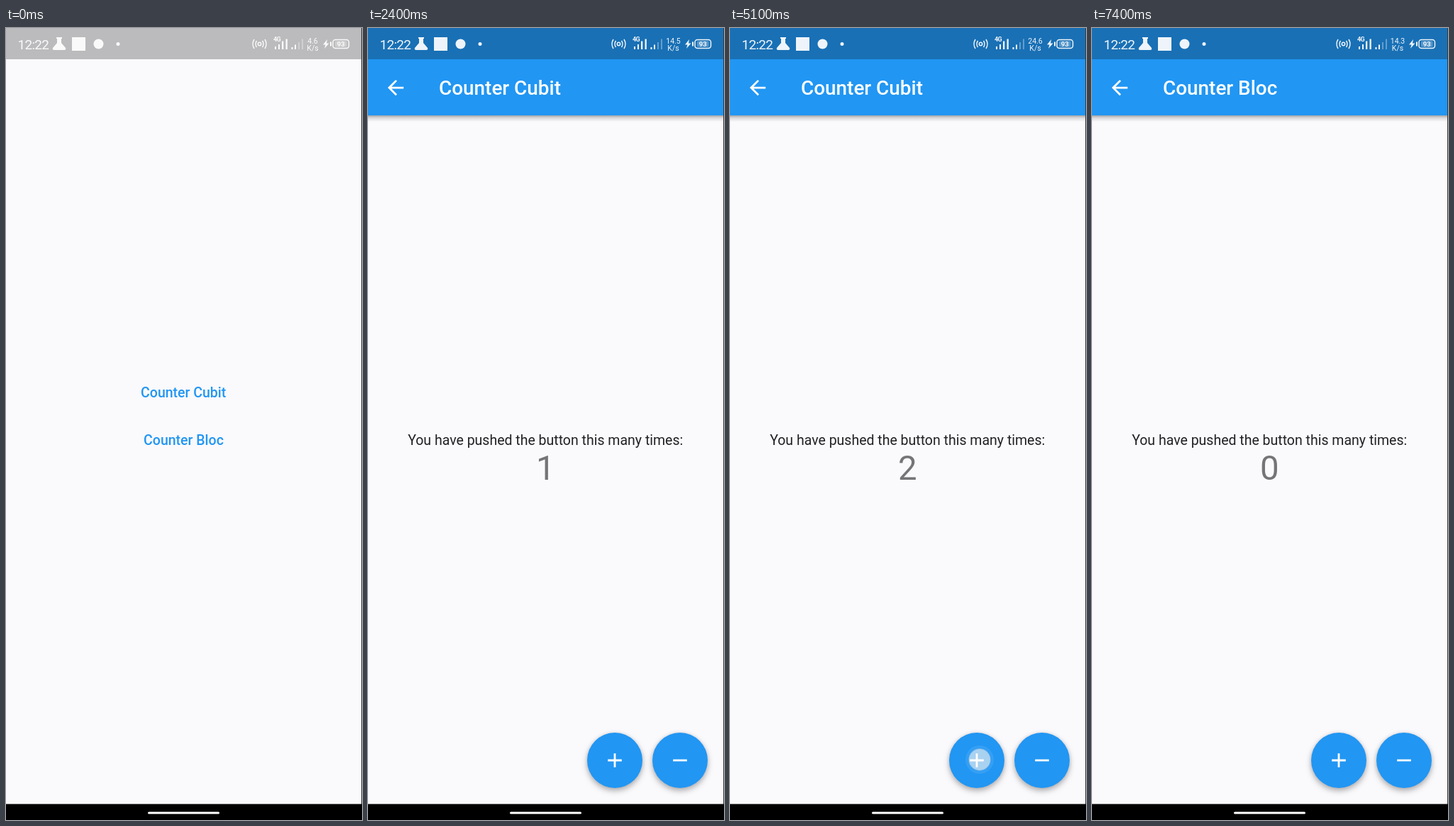
Write an HTML page that moves like this. It is 502 px wide and 1115 px high and loops after 8 s.

```html
<!DOCTYPE html>
<html lang="en">
<head>
<meta charset="utf-8">
<title>Counter demo</title>
<style>
  html, body { margin: 0; width: 100%; height: 100%; overflow: hidden; background: #000; }
  svg { display: block; width: 100vw; height: 100vh; font-family: Roboto, sans-serif; }
  #home, #page { transform-origin: 251px 568px; }
  .mid { text-anchor: middle; }
  .button { font-size: 19.5px; font-weight: 500; fill: #2196f3; }
  .fab { fill: #2196f3; filter: drop-shadow(0 4px 4px rgba(0,0,0,.28)) drop-shadow(0 0 2px rgba(0,0,0,.1)); }
  .icon { stroke: #fff; stroke-width: 2.8; fill: none; }
  .status { fill: #fff; opacity: .93; }
  .line { fill: none; stroke: #fff; stroke-width: 1.5; }
</style>
</head>
<body>
<svg viewBox="0 0 502 1115">
  <defs>
    <clipPath id="clip-cubit"><rect x="179" y="488" width="142" height="50" rx="5.6"/></clipPath>
    <clipPath id="clip-bloc"><rect x="183" y="555" width="135" height="50" rx="5.6"/></clipPath>
    <clipPath id="clip-back"><circle cx="39" cy="84" r="33"/></clipPath>
    <clipPath id="clip-plus"><circle cx="348" cy="1031" r="39"/></clipPath>
    <clipPath id="clip-minus"><circle cx="440" cy="1031" r="39"/></clipPath>
    <linearGradient id="shade" x2="0" y2="1">
      <stop stop-opacity=".34"/><stop offset=".4" stop-opacity=".13"/><stop offset="1" stop-opacity="0"/>
    </linearGradient>
  </defs>

  <g id="home">
    <rect width="502" height="1115" fill="#faf9fc"/>
    <g id="ink-cubit" clip-path="url(#clip-cubit)"/>
    <g id="ink-bloc" clip-path="url(#clip-bloc)"/>
    <text class="mid button" x="250.2" y="520">Counter Cubit</text>
    <text class="mid button" x="250.5" y="587">Counter Bloc</text>
  </g>

  <g id="page">
    <rect width="502" height="1115" fill="#faf9fc"/>
    <rect y="123" width="502" height="9" fill="url(#shade)"/>
    <rect width="502" height="123" fill="#2196f3"/>
    <g id="ink-back" clip-path="url(#clip-back)"/>
    <path transform="translate(22.3 67.3) scale(1.394)" fill="#fff"
      d="M20 11H7.83l5.59-5.59L12 4l-8 8 8 8 1.41-1.41L7.83 13H20z"/>
    <text id="title" x="100" y="94" font-size="27.9" font-weight="500" fill="#fff"></text>
    <text class="mid" x="250.2" y="587" font-size="19.5" fill="#222124">You have pushed the button this many times:</text>
    <text id="count" class="mid" x="250.2" y="636" font-size="47.4" fill="#757477"></text>
    <circle class="fab" cx="348" cy="1031" r="39"/>
    <g id="ink-plus" clip-path="url(#clip-plus)"/>
    <path class="icon" d="M338.2 1031h19.6M348 1021.2v19.6"/>
    <circle class="fab" cx="440" cy="1031" r="39"/>
    <g id="ink-minus" clip-path="url(#clip-minus)"/>
    <path class="icon" d="M430.2 1031h19.6"/>
  </g>

  <rect width="502" height="44" opacity=".255"/>
  <g class="status">
    <text x="16.5" y="30" font-size="19" letter-spacing="-.7">12:22</text>
    <path d="M71 13h8v2h-1v6l6 7q1 3-2 3H68q-3 0-2-3l6-7v-6h-1z"/>
    <rect x="93" y="13" width="19" height="19"/>
    <circle cx="130.5" cy="22.5" r="7"/>
    <circle cx="158" cy="22.5" r="2.5"/>
    <g id="signal">
      <circle class="line" cx="357.5" cy="22.5" r="2.2"/>
      <path class="line" d="M353.5 18q-3 4.500 0 9M361.500 18q3 4.500 0 9M350 16q-4 6.500 0 13M365 16q4 6.500 0 13"/>
      <text x="377" y="19" font-size="9" font-weight="700" letter-spacing="-.6">4G</text>
      <path d="M379 26h2v4h-2zM384 23h2v7h-2zM389 18.500h2.300V30H389zM394.500 15.500h2.300V30h-2.300zM402.500 27h2v3h-2zM407 23.500h2V30h-2z"/>
      <path opacity=".35" d="M412 20h2v10h-2zM417 15.500h2V30h-2z"/>
    </g>
    <g id="rate" class="mid" font-size="10.5">
      <text id="speed" x="432.500" y="22"></text>
      <text x="432.500" y="32">K/s</text>
    </g>
    <path d="M453 16l-6 7.500h3.500L449 29l6.500-7.500H452zM457 19.500h2v6h-2z"/>
    <rect class="line" x="461" y="16.500" width="22.500" height="12" rx="3.500"/>
    <rect x="464" y="18.500" width="16.500" height="8" rx="1" opacity=".3"/>
    <text class="mid" x="472.300" y="26" font-size="9.500" font-weight="700">93</text>
  </g>

  <g id="dot">
    <circle r="20" fill="#fff" opacity=".18"/>
    <circle r="15" fill="#fff"/>
  </g>
  <circle id="ring" r="16" fill="none" stroke="#000" stroke-opacity=".045" stroke-width="2"/>
  <rect x="501" width="1" height="1093" fill="#39393b"/>
  <rect y="1092.500" width="502" height="23"/>
  <rect x="200" y="1103.500" width="101" height="3" rx="1.500" fill="#fff"/>
</svg>

<script>
const LOOP = 8000, STEP = 100;
const $ = id => document.getElementById(id);
const clamp = v => Math.max(0, Math.min(1, v));

const tap = (target, x, y, down, up, fade) => ({ target, x, y, down, up, fade });
const taps = [
  tap('cubit', 250, 515, 100, 200, 200),
  tap('plus', 352, 1036, 1700, 1900, 500),
  tap('minus', 440, 1043, 2900, 3300, 400),
  tap('minus', 435, 1031, 4000, 4200, 400),
  tap('plus', 352, 1031, 4800, 4900, 100),
  tap('plus', 352, 1030, 5000, 5200, 200),
  tap('back', 35, 94, 5900, 6000, 300),
  tap('bloc', 250, 582, 6900, 7000, 300),
];
const counts = [[0, 0], [1900, 1], [3300, 0], [4900, 1], [5100, 2], [6900, 0]];
// Each entry: start, network rate, shift of the signal icons.
const rates = [[0, '4.6', 0], [1300, '14.5', -4], [4300, '24.6', -4], [7300, '14.3', -3]];
const current = (list, t) => list.findLast(entry => entry[0] <= t);

for (const item of taps) {
  item.ink = document.createElementNS('http://www.w3.org/2000/svg', 'circle');
  item.ink.setAttribute('cx', item.x);
  item.ink.setAttribute('cy', item.y);
  const onText = item.target === 'cubit' || item.target === 'bloc';
  item.ink.setAttribute('fill', onText ? '#2196f3' : '#c8c8c8');
  item.strength = onText ? .12 : .36;
  $('ink-' + item.target).append(item.ink);
}

// 0 shows the home screen, 1 shows the counter page.
function pageProgress(t) {
  if (t < 600) return 0;
  if (t < 5900) return 1;
  if (t < 7100) return (1 - clamp((t - 5900) / 300)) ** 2;
  return 1 - (1 - clamp((t - 7100) / 300)) ** 2;
}

function drawTouches(t) {
  let dotOpacity = 0, ringOpacity = 0;
  for (const { target, x, y, down, up, fade, ink, strength } of taps) {
    const held = t >= down && t < up;
    const fading = t >= up && t < up + fade;
    const opacity = held ? strength : fading ? strength * .58 * (1 - (t - up) / fade) : 0;
    ink.setAttribute('r', held ? (t - down) * .157 : 160);
    ink.setAttribute('opacity', opacity);
    if (!held && !fading) continue;
    $('dot').setAttribute('transform', `translate(${x} ${y})`);
    $('ring').setAttribute('transform', `translate(${x} ${y})`);
    dotOpacity = held ? .47 : t === up ? .24 : 0;
    ringOpacity = target === 'plus' || target === 'minus' ? 0 : 1;
  }
  $('dot').setAttribute('opacity', dotOpacity);
  $('ring').setAttribute('opacity', ringOpacity);
}

function draw(t) {
  const p = pageProgress(t);
  $('home').style.transform = `scale(${1 + .05 * p})`;
  $('page').style.transform = `scale(${.9 + .1 * p})`;
  $('page').style.opacity = clamp((p - .2) / .4);
  $('title').textContent = t < 6900 ? 'Counter Cubit' : 'Counter Bloc';
  $('count').textContent = current(counts, t)[1];

  const [, speed, shift] = current(rates, t);
  $('speed').textContent = speed;
  $('signal').setAttribute('transform', `translate(${shift})`);
  $('rate').setAttribute('transform', `translate(${shift / 2})`);
  drawTouches(t);
}

const start = performance.now();
function tick() {
  const t = (performance.now() - start) % LOOP;
  draw(Math.floor(t / STEP) * STEP);
  requestAnimationFrame(tick);
}
tick();
</script>
</body>
</html>
```
